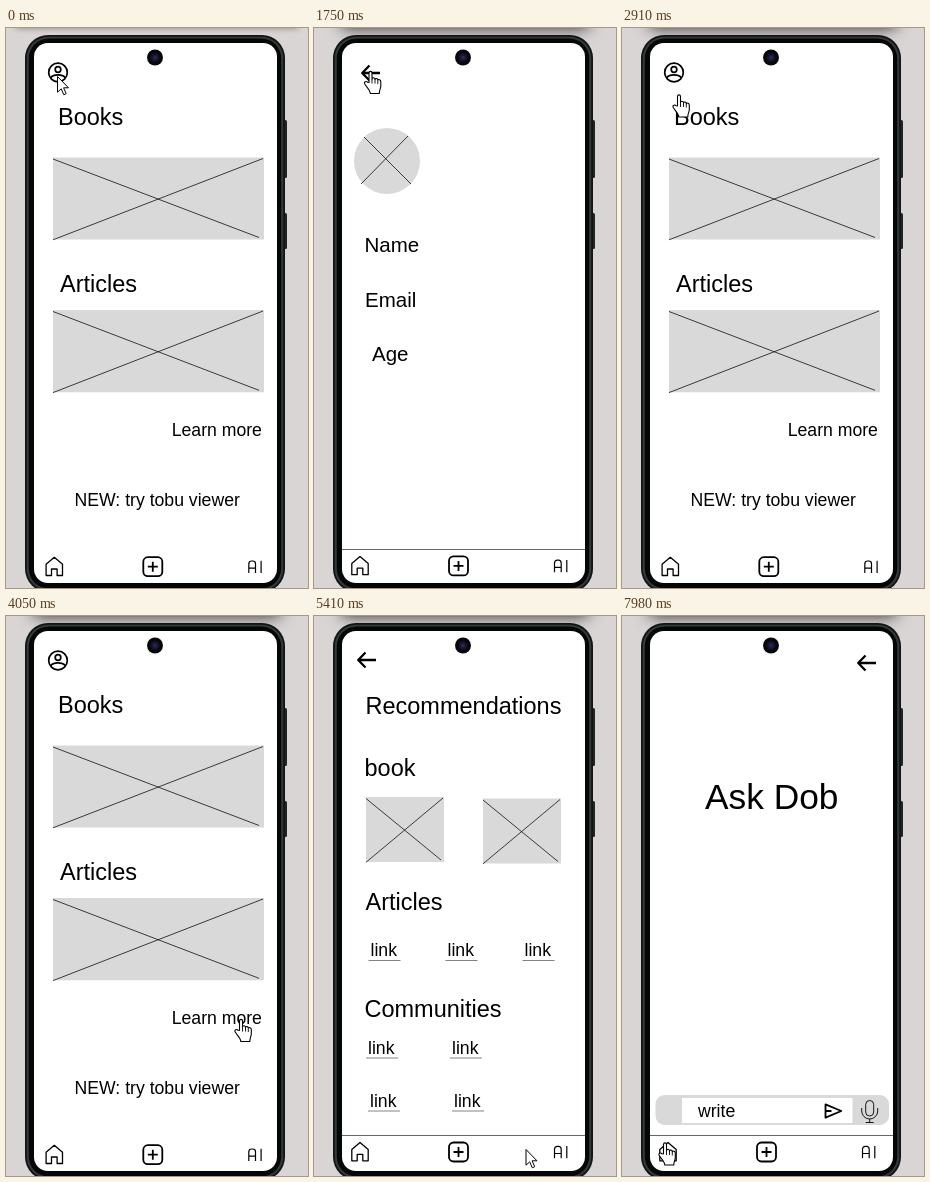
Write an HTML page with a canvas that moves like this. It is 302x560 px and loops after 8000 ms.

```html
<!DOCTYPE html>
<html lang="en">
<head>
<meta charset="utf-8">
<title>Reader prototype</title>
<style>
  html, body { margin: 0; width: 100%; height: 100%; overflow: hidden; background: #d9d5d4; }
  canvas { display: block; width: 302px; height: 560px; }
</style>
</head>
<body>
<canvas id="stage"></canvas>
<script>
const W = 302, H = 560, LOOP = 8000, STEP = 130;
const canvas = document.getElementById('stage');
const ctx = canvas.getContext('2d');
const dpr = window.devicePixelRatio || 1;
canvas.width = W * dpr;
canvas.height = H * dpr;
ctx.scale(dpr, dpr);

const GREY = '#d9d9d9', WALL = '#d9d5d4';
const TITLE = 23.5, FIELD = 20.5, BODY = 17.65;

function text(str, x, y, size) {
  ctx.font = size + 'px "Liberation Sans", Arial, sans-serif';
  ctx.fillStyle = '#000';
  ctx.fillText(str, x, y);
}

function line(x1, y1, x2, y2, width = 0.8, color = '#111') {
  ctx.strokeStyle = color;
  ctx.lineWidth = width;
  ctx.beginPath();
  ctx.moveTo(x1, y1);
  ctx.lineTo(x2, y2);
  ctx.stroke();
}

function rounded(x, y, w, h, r, fill) {
  ctx.fillStyle = fill;
  ctx.beginPath();
  ctx.roundRect(x, y, w, h, r);
  ctx.fill();
}

function disc(x, y, r, fill) {
  ctx.fillStyle = fill;
  ctx.beginPath();
  ctx.arc(x, y, r, 0, Math.PI * 2);
  ctx.fill();
}

function ring(x, y, r, width) {
  ctx.strokeStyle = '#000';
  ctx.lineWidth = width;
  ctx.beginPath();
  ctx.arc(x, y, r, 0, Math.PI * 2);
  ctx.stroke();
}

// SVG path drawn at an offset
function shape(d, x, y, width, fill) {
  const path = new Path2D(d);
  ctx.save();
  ctx.translate(x, y);
  ctx.lineJoin = 'round';
  if (fill) {
    ctx.fillStyle = fill;
    ctx.fill(path);
  }
  ctx.strokeStyle = '#000';
  ctx.lineWidth = width;
  ctx.stroke(path);
  ctx.restore();
}

function placeholder(x, y, w, h, inset) {
  ctx.fillStyle = GREY;
  ctx.fillRect(x, y, w, h);
  line(x, y + 1.5, x + w - inset, y + h - 2);
  line(x, y + h + 0.3, x + w - 1, y + 1);
}

function link(x, y) {
  text('link', x, y, BODY);
  line(x - 2, y + 4.5, x + 30, y + 4.5, 0.9, '#777');
}

function backArrow(x, y) {
  shape('M19 0H1.5M8.5 -7.5L1.2 0L8.5 7.5', x, y, 2.3);
}

function avatar(x, y) {
  ring(x, y, 9.3, 1.7);
  ring(x, y - 3, 2.8, 1.7);
  shape('M-7.4 5.4C-5.4 1.3 5.4 1.3 7.4 5.4', x, y, 1.9);
}

function nav(x, y, rule) {
  if (rule) line(28, rule, 271, rule, 1, '#666');
  shape('M-8.2 9V-2.2L0 -9.2L8.2 -2.2V9H2.8V2.5H-2.8V9Z', x, y, 1.3);
  ctx.strokeStyle = '#000';
  ctx.lineWidth = 1.8;
  ctx.beginPath();
  ctx.roundRect(x + 89, y - 9.3, 19, 19, 4.5);
  ctx.stroke();
  shape('M-5 0H5M0 -5V5', x + 98.5, y + 0.2, 1.8);
  shape('M-6.5 6V-3Q-6.5 -6 -3.5 -6H-2.5Q0.2 -6 0.2 -3V6M-6.5 1.2H0.2M5.8 -6.2V6', x + 201, y + 0.5, 1.2);
}

const pages = {
  home() {
    avatar(52, 44.5);
    text('Books', 52, 97, TITLE);
    placeholder(47, 129.5, 211, 82, 5);
    text('Articles', 54, 263.5, TITLE);
    placeholder(47, 282, 211, 82.3, 5);
    text('Learn more', 165.7, 408, BODY);
    text('NEW: try tobu viewer', 68.5, 478, BODY);
    nav(48.3, 538.5);
  },
  profile() {
    backArrow(47, 45);
    disc(73, 133, 33, GREY);
    line(50, 109, 97, 156);
    line(47, 156, 94, 108);
    text('Name', 50.5, 224, FIELD);
    text('Email', 51, 279, FIELD);
    text('Age', 58, 333, FIELD);
    nav(46, 537.7, 521.5);
  },
  picks() {
    backArrow(43, 44);
    text('Recommendations', 51.5, 98, TITLE);
    text('book', 50.5, 160, TITLE);
    placeholder(52, 181, 78, 65, 3);
    placeholder(169, 182.5, 78, 65, 3);
    text('Articles', 51.5, 294, TITLE);
    for (let i = 0; i < 3; i++) link(56.5 + 77 * i, 340);
    text('Communities', 50.5, 401, TITLE);
    for (const x of [54, 138]) {
      link(x, 437.5);
      link(x + 2, 490.5);
    }
    nav(46, 535.8, 519.5);
  },
  ask() {
    backArrow(235, 47);
    text('Ask Dob', 83, 193, 35.3);
    rounded(33.5, 479, 233.5, 30, 9, GREY);
    ctx.fillStyle = '#fff';
    ctx.fillRect(60, 482, 170.5, 25);
    text('write', 76, 500.5, BODY);
    shape('M0.5 -6.6L16.3 0L0.5 6.6ZM0.5 0H6.5', 203, 495, 1.8);
    shape('M-4 -6.5A4 4 0 0 1 4 -6.5V1A4 4 0 0 1 -4 1Z', 247.7, 495, 0.9);
    shape('M-8 -3V0A8 8 0 0 0 8 0V-3M0 8V11.5M-4 11.5H4', 247.7, 495, 0.9);
    nav(46, 535.8, 519.5);
  }
};

// Soft shadow cast from an element above the stage
function topShadow(deep) {
  ctx.save();
  ctx.shadowColor = deep ? 'rgba(0,0,0,0.8)' : 'rgba(0,0,0,0.4)';
  ctx.shadowBlur = (deep ? 16 : 6) * dpr;
  const edge = deep ? 28 : 10;
  ctx.fillRect(edge, -20, W - 2 * edge, 20);
  ctx.restore();
}

function phone(deep) {
  ctx.fillStyle = WALL;
  ctx.fillRect(0, 0, W, H);
  topShadow(deep);
  rounded(277, 92, 4, 58, 1.5, '#222526');
  rounded(277, 185, 4, 36, 1.5, '#222526');
  rounded(19, 7, 260, 557, 23, '#121515');
  rounded(20.8, 8.8, 256.4, 553.4, 21.5, '#343a3b');
  rounded(22.8, 10.5, 252.4, 550, 20, '#050606');
  rounded(28, 15, 243, 540, 14, '#fff');
}

function camera() {
  disc(149, 29.5, 8, '#08080c');
  disc(149, 29.5, 4.3, '#15162e');
  disc(149, 29.5, 2, '#25265a');
}

// Both pointers are drawn with their tip at (x, y)
function arrow(x, y) {
  shape('M0.5 0.5V16.2L4.2 12.8L6.8 18.8L9.2 17.7L6.6 11.8H11.5Z', x, y, 1, '#fff');
}

function hand(x, y) {
  x -= 6.5;
  shape('M5 12V2.5C5 0.3 8 0.3 8 2.5V8.5C8.4 6.7 11 7 11 9C11.5 7.4 13.8 7.8 13.8 9.8' +
    'C14.4 8.5 16.8 9 16.8 11V15.5C16.8 18 15.3 19 15.3 23H6.3C6.3 19.5 2.8 17 0.6 13.3' +
    'C-0.4 11.4 2.4 10.2 3.6 11.8Z', x, y, 1.1, '#fff');
  shape('M8 8.5V13M11 9V13M13.8 10V13.5', x, y, 0.9);
}

// Page shown from each time on
const views = { 0: 'home', 1620: 'profile', 2910: 'home', 4180: 'picks', 6070: 'ask' };

// Pointer trips: start ms, steps, end point, pointer at rest
const trips = [
  [430, 4, 59.5, 41, hand],
  [1620, 1, 56.5, 42.5, hand],
  [2010, 2, 70, 200, arrow],
  [2430, 2, 58.5, 46, hand],
  [2910, 1, 57, 66, hand],
  [3060, 2, 67, 290, arrow],
  [3510, 5, 235, 402.5, hand],
  [4300, 2, 210.5, 447, arrow],
  [5410, 1, 211.5, 533, arrow],
  [5530, 3, 247, 536, hand],
  [6070, 2, 218.5, 547, arrow],
  [7460, 1, 183, 540, arrow],
  [7610, 3, 43, 526, hand]
];

const easeOut = p => 1 - (1 - p) ** 2;

// The pointer is sampled every STEP ms, so it jumps along each trip
function pointer(t) {
  let x = 51, y = 48, draw = arrow;
  for (const [start, steps, endX, endY, rest] of trips) {
    if (t < start) break;
    const done = Math.min(1, (Math.floor((t - start) / STEP) + 1) / steps);
    const k = easeOut(done);
    x += (endX - x) * k;
    y += (endY - y) * k;
    draw = done < 1 ? arrow : rest;
  }
  draw(x, y);
}

function draw(t) {
  const since = Object.keys(views).filter(ms => ms <= t).pop();
  phone(since > 0);
  pages[views[since]]();
  camera();
  pointer(t);
}

const start = performance.now();
function tick() {
  draw((performance.now() - start) % LOOP);
  requestAnimationFrame(tick);
}
tick();
</script>
</body>
</html>
```
